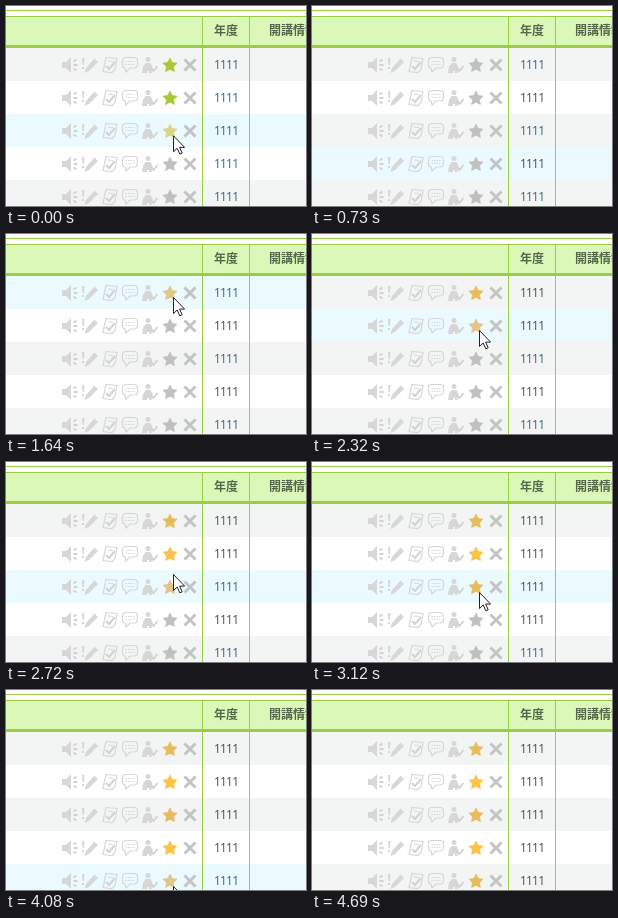
An HTML page that plays this animation: 300x200 px, repeating every 5.88 s.

```html
<!DOCTYPE html>
<html lang="ja">
<head>
<meta charset="utf-8">
<style>
html, body { margin: 0; width: 100%; height: 100%; overflow: hidden; background: #fff; }
svg { display: block; width: 300px; height: 200px; }
.head { font: 700 12px "Noto Sans CJK JP", "Noto Sans CJK", sans-serif; fill: #55684a; }
.year { font: 500 12px "Open Sans", "Noto Sans", sans-serif; letter-spacing: -.8px; }
.line { fill: none; stroke: #d7d7d7; stroke-width: 1.2; }
.bold { fill: none; stroke: #d3d3d3; stroke-width: 2; }
.solid { fill: #d7d7d7; }
</style>
</head>
<body>
<svg viewBox="0 0 300 200">
  <defs>
    <g id="icons">
      <path class="solid" d="M56 56h4l5-5v16l-5-5h-4z"/>
      <path class="bold" d="M67.500 55.500l3-2M67.500 59h4M67.500 62.500l3 2"/>
      <path class="solid" d="M76 52h2.400l-.5 7h-1.400zM76 61h2v2h-2z"/>
      <path class="solid" d="M78.500 67l1.500-5 8.500-9.500 3.500 3.500-9 9z"/>
      <path class="line" d="M100 51.500l11 1-2 11-3 3-9-1zM102 55l5 .5"/>
      <path class="bold" d="M100 60l3 3 6-7"/>
      <path class="line" d="M119 62q-2.500-.5-2.500-3v-4q0-3.500 3.500-3.500h8q3.500 0 3.500 3.500v3.500q0 3.500-3.500 3.500h-4l-4 4z"/>
      <path class="line" d="M119.500 55.500h9M119.500 58.500h9" stroke-dasharray="1.5 1"/>
      <circle class="solid" cx="142" cy="53.500" r="2.500"/>
      <path class="solid" d="M136 67l1-6 2.500-4h5l2 4-1 6h-2.500v-2h-2v2z"/>
      <path class="bold" d="M145 62l2.500 3 4-5"/>
      <path d="M178.500 53.500l11 11m0-11l-11 11" stroke="#c4c4c4" stroke-width="3"/>
    </g>
  </defs>
  <g id="rows"></g>
  <path fill="#dcf8b8" d="M0 11h300v28H0z"/>
  <path fill="#9acf45" d="M0 4h300v1H0zM0 10h300v1H0zM0 39h300v3H0zM196 11h1v189h-1zM243 11h1v189h-1z"/>
  <text class="head" x="208" y="29">年度</text>
  <text class="head" x="263" y="29">開講情報</text>
  <path id="arrow" fill="#fff" stroke="#222" d="M.5.5v16l3.700-3.500 2.600 5.800 2.400-1-2.600-5.700h5z"/>
  <path id="beam" fill="none" stroke="#444" d="M-3-7.500h2l1 1 1-1h2M0-6.500v13M-3 7.500h2l1-1 1 1h2"/>
</svg>
<script>
const LOOP = 5880, TOP = 42, ROW = 33;
const GREEN = '#a9c73a', LIME = '#dcd586', GREY = '#c0c0c0', TAN = '#e2c58a';
const $ = id => document.getElementById(id);

// when the pointer sets off for each row's star, and when it disappears
const moves = [730, 1970, 2650, 3120, 3740, 4690];
const clear = 70;

const starPoints = Array.from({length: 10}, (_, i) => {
  const r = i % 2 ? 3.7 : 7.4, a = i * Math.PI / 5;
  return [164 + r * Math.sin(a), 59.5 - r * Math.cos(a)].map(n => n.toFixed(2));
}).join(' ');

const rows = [0, 1, 2, 3, 4].map(i => {
  const g = document.createElementNS('http://www.w3.org/2000/svg', 'g');
  g.setAttribute('transform', `translate(0 ${i * ROW})`);
  g.innerHTML = `<rect y="${TOP}" width="300" height="${ROW}"/>
    <use href="#icons"/>
    <polygon points="${starPoints}" stroke-width=".8" stroke-linejoin="round"/>
    <text class="year" x="208" y="63">1111</text>`;
  $('rows').append(g);
  return ['rect', 'polygon', 'text'].map(s => g.querySelector(s));
});

const spot = i => i < 0 ? [365, 162] : [167, 62.5 + 33.4 * i];

function pointer(t) {
  if (t < clear) return spot(2);
  const i = moves.findLastIndex(m => t >= m);
  if (i < 0 || i === rows.length) return null;
  const p = Math.min(1, (t - moves[i]) / (i ? 350 : 600));
  const ease = 1 - (1 - p) ** 3;
  const from = spot(i - 1), to = spot(i);
  return from.map((v, n) => Math.round(v + (to[n] - v) * ease));
}

function starColor(i, t, hover) {
  if (t < clear) return i < 2 ? GREEN : hover ? LIME : GREY;
  if (t >= moves[i + 1]) return i % 2 ? '#fdc246' : '#e8bb5c';
  return hover ? TAN : GREY;
}

function place(el, show, pos) {
  el.style.display = show ? '' : 'none';
  if (show) el.setAttribute('transform', `translate(${pos})`);
}

function draw(t) {
  const pos = pointer(t);
  const over = pos ? Math.floor((pos[1] - TOP) / ROW) : -1;
  rows.forEach(([bg, star, year], i) => {
    const hover = i === over;
    bg.style.fill = hover ? '#ebfaff' : i % 2 ? '#fff' : '#f3f4f4';
    star.style.fill = star.style.stroke = starColor(i, t, hover && pos[0] < 174);
    year.style.fill = t < moves[i % 2 ? 0 : i + 1] ? '#2c6680' : '#4a4a4a';
  });
  const onText = pos && pos[0] > 205 && pos[0] < 235;
  place($('arrow'), pos && !onText, pos);
  place($('beam'), onText, pos);
}

const start = performance.now();
function frame() {
  draw((performance.now() - start) % LOOP);
  requestAnimationFrame(frame);
}
frame();
</script>
</body>
</html>
```
